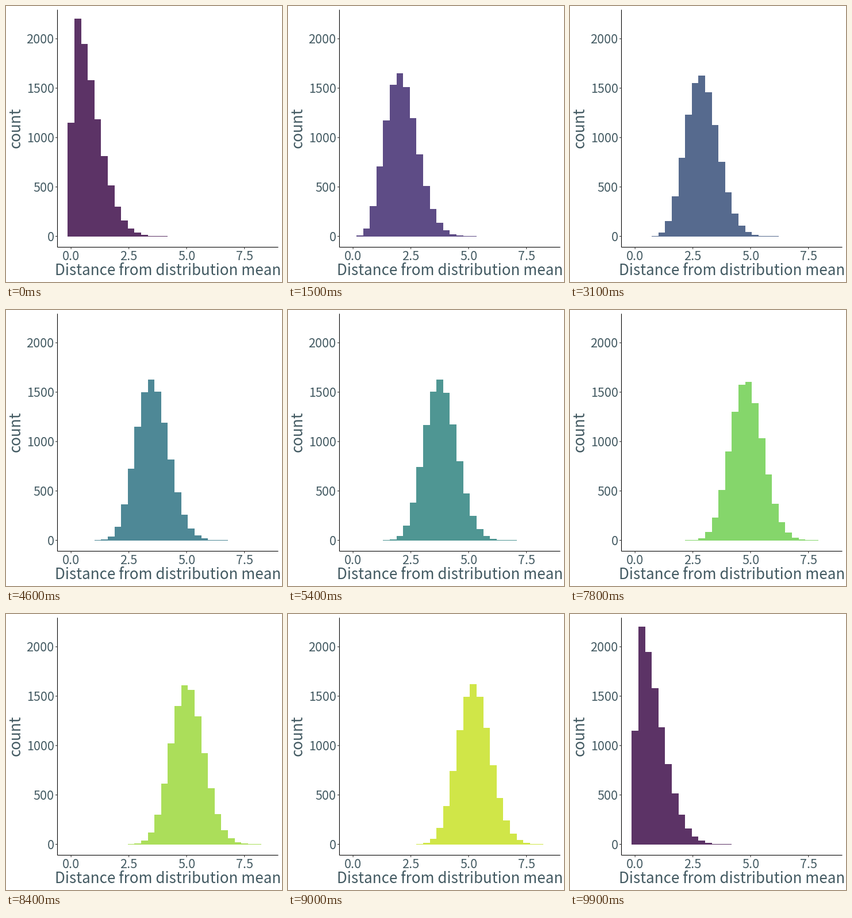
Animation, 480 px wide and 480 px high, one loop 10000 ms. Source, as a matplotlib script:

```python
import math

import matplotlib.pyplot as plt
import numpy as np
from matplotlib.animation import FuncAnimation
from matplotlib.patches import Rectangle

SIZE = 480
FRAMES, STEP = 100, 100
DIMS, BINS, SAMPLES = 30, 30, 10000
TEXT, FONT = "#435a62", "Noto Sans CJK JP"

X0, PX_X = 113.15, 40.2     # pixel of zero and pixels per unit
Y0, PX_Y = 400.6, 0.1718
BIN_PX = 11.61
BASE = 401
AXIS_X, AXIS_Y = 89.5, 419.5

# Fill colours at a few dimensions, blended in between
COLOR_DIMS = [1, 5, 13, 19, 24, 28, 30]
COLORS = np.array([(92, 51, 102), (94, 76, 134), (78, 136, 150), (81, 178, 140),
                   (133, 214, 107), (208, 230, 72), (246, 235, 78)]) / 255

# Frames at which the next dimension appears; the last one wraps to the first
CHANGES = np.r_[3:44:4, 46:62:3, 63:100:3]


def chi_counts(dim):
    """Expected bin counts of the norm of a dim-dimensional normal vector."""
    width = BIN_PX / PX_X
    sub = (np.arange(40) + 0.5) / 40 - 0.5
    r = (np.arange(BINS)[:, None] + sub) * width
    pos = np.maximum(r, 1e-9)
    log_norm = (dim / 2 - 1) * math.log(2) + math.lgamma(dim / 2)
    pdf = np.exp((dim - 1) * np.log(pos) - pos ** 2 / 2 - log_norm) * (r > 0)
    return SAMPLES * width * pdf.mean(axis=1)


def color_for(dim):
    return [np.interp(dim, COLOR_DIMS, channel) for channel in COLORS.T]


HISTS = [chi_counts(d) for d in range(1, DIMS + 1)]
FILLS = [color_for(d) for d in range(1, DIMS + 1)]

fig = plt.figure(figsize=(SIZE / 72, SIZE / 72), dpi=72, facecolor="white")
ax = fig.add_axes([0, 0, 1, 1])
ax.set(xlim=(0, SIZE), ylim=(SIZE, 0))
ax.axis("off")


def line(xs, ys, color="black"):
    ax.plot(xs, ys, color=color, lw=1.07, solid_capstyle="butt", snap=False)


def label(x, y, s, size, **kw):
    ax.text(x, y, s, fontsize=size, color=TEXT, family=FONT, va="baseline", **kw)


line([AXIS_X, AXIS_X], [6.5, AXIS_Y])
line([AXIS_X, 473.5], [AXIS_Y, AXIS_Y])
for v in range(0, 2001, 500):
    y = Y0 - v * PX_Y
    line([AXIS_X - 3.5, AXIS_X], [y, y], "#333333")
    label(83.5, y + 8, str(v), 21.6, ha="right")
for v in (0, 2.5, 5, 7.5):
    x = X0 + v * PX_X
    line([x, x], [AXIS_Y, AXIS_Y + 3.5], "#333333")
    label(x, 441.5, f"{v:.1f}", 21.6, ha="center")
label(281.3, 468, "Distance from distribution mean", 26, ha="center")
label(25, 212.2, "count", 26, ha="center", rotation=90, rotation_mode="anchor")

edges = np.round(X0 + BIN_PX * (np.arange(BINS + 1) - 0.5))
bars = [ax.add_patch(Rectangle((a, BASE), b - a, 0, lw=0, antialiased=False))
        for a, b in zip(edges[:-1], edges[1:])]


def update(frame):
    state = int(np.searchsorted(CHANGES, frame, side="right")) % DIMS
    for bar, count in zip(bars, HISTS[state]):
        top = min(BASE - 1, round(Y0 - count * PX_Y))
        bar.set_y(top)
        bar.set_height(BASE - top)
        bar.set_visible(bool(count > 0.4))
        bar.set_facecolor(FILLS[state])
    return bars


anim = FuncAnimation(fig, update, frames=FRAMES, interval=STEP,
                     repeat=True, repeat_delay=0, blit=False)
plt.show()
```
